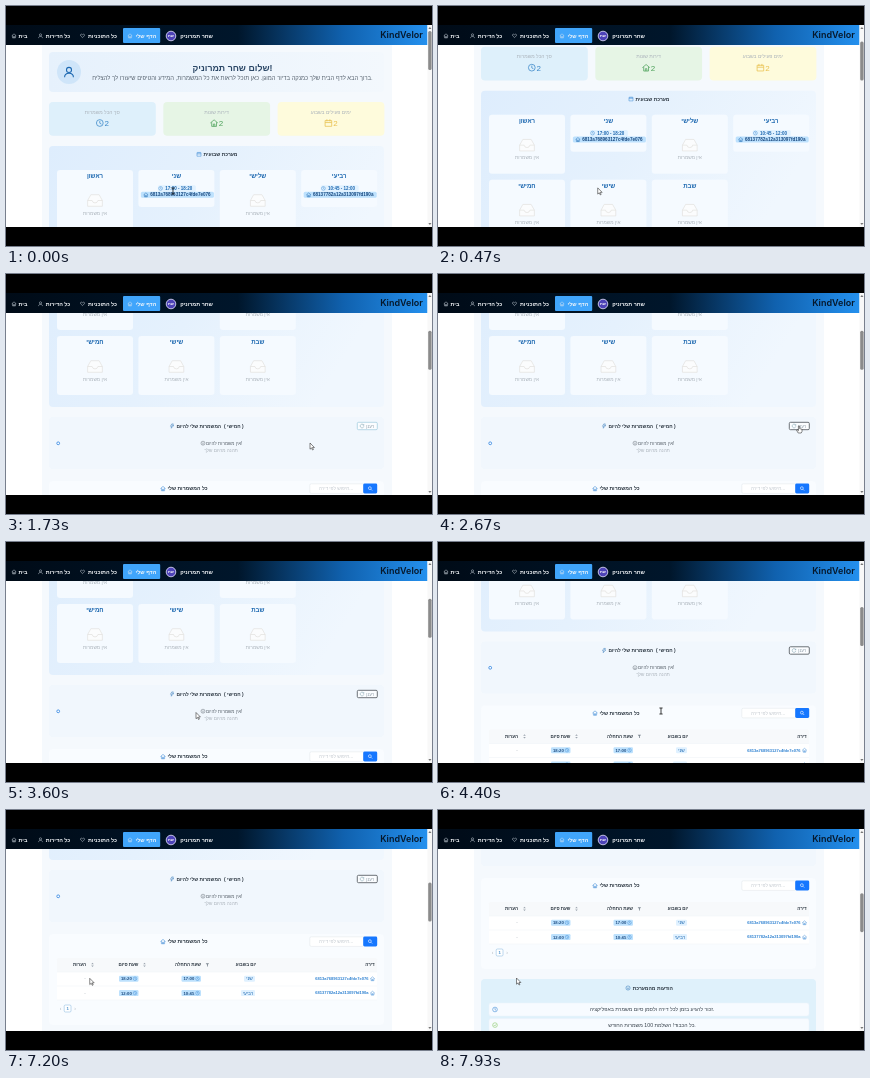
Write an HTML page that moves like this. It is 426 by 240 pixels and loops after 8 s.

```html
<!DOCTYPE html>
<html lang="he">
<head>
<meta charset="utf-8">
<title>Dashboard</title>
<style>
html, body { margin: 0; width: 100%; height: 100%; overflow: hidden; background: #000; }
svg { display: block; width: 100vw; height: 100vh; }
text { font-family: "Liberation Sans", Arial, sans-serif; }
.brand { font-family: Inter, sans-serif; }
</style>
</head>
<body>
<svg id="stage" viewBox="0 0 426 240" direction="ltr">
  <defs>
    <clipPath id="view"><rect y="19" width="426" height="202"/></clipPath>
    <linearGradient id="bar">
      <stop stop-color="#000b17"/><stop offset=".55" stop-color="#00162b"/>
      <stop offset=".8" stop-color="#1061ae"/><stop offset="1" stop-color="#2490ee"/>
    </linearGradient>
    <linearGradient id="hello"><stop stop-color="#e6f1fc"/><stop offset="1" stop-color="#f3f8fd"/></linearGradient>
    <linearGradient id="week" x2="1" y2=".3"><stop stop-color="#deedfd"/><stop offset=".5" stop-color="#e5f1fd"/><stop offset="1" stop-color="#f0f7fe"/></linearGradient>
    <g id="home" fill="none" stroke="currentColor" stroke-linejoin="round"><path d="M0 5 5 .8 10 5M1.8 4V9.5H8.2V4M4 9.5V6.4H6V9.5"/></g>
    <g id="clock" fill="none" stroke="currentColor"><circle cx="5" cy="5" r="4.5"/><path d="M5 2.2V5.3L7.2 6.5"/></g>
    <g id="user" fill="none" stroke="currentColor"><circle cx="5" cy="3" r="2.4"/><path d="M.8 10C.8 4.8 9.2 4.8 9.2 10"/></g>
    <g id="heart" fill="none" stroke="currentColor"><path d="M5 9 1 5C-.8 2 3 0 5 2.7 7 0 10.8 2 9 5Z"/></g>
    <g id="calendar" fill="none" stroke="currentColor"><path d="M.6 1.8H9.4V9.4H.6ZM.6 4.4H9.4M3 0V2.8M7 0V2.8"/></g>
    <g id="smile" fill="none" stroke="currentColor"><circle cx="5" cy="5" r="4.5"/><path d="M2.8 5.8Q5 8.6 7.2 5.8M3.3 3.2V4.2M6.7 3.2V4.2"/></g>
    <g id="bolt" fill="none" stroke="currentColor"><path d="M4.5.5H8L6 4H9L3 9.8 4.3 5.6H1.8Z"/></g>
    <g id="reload" fill="none" stroke="currentColor"><path d="M9 3A4.4 4.4 0 1 0 9.4 6M9.3.8V3.3H6.8"/></g>
    <g id="search" fill="none" stroke="currentColor" stroke-width="1.4"><circle cx="4.2" cy="4.2" r="3.4"/><path d="M6.8 6.8 9.8 9.8"/></g>
    <g id="check" fill="none" stroke="currentColor"><circle cx="5" cy="5" r="4.5"/><path d="M2.8 5 4.5 6.8 7.4 3.4"/></g>
    <g id="tray" fill="#fbfcfd" stroke="currentColor" stroke-width=".4" stroke-linejoin="round"><path d="M.4 5 2.4 1.4H7.6L9.6 5V8.6H.4Z"/><path d="M.4 5H3.2Q3.4 6.5 5 6.5T6.8 5H9.6"/></g>
  </defs>
  <g clip-path="url(#view)">
    <rect y="19" width="426" height="202" fill="#fff"/>
    <rect x="36" y="19" width="350" height="202" fill="#f5f9fd"/>
    <g id="page"></g>
    <g id="header"></g>
    <g id="cursor">
      <path id="arrow" d="M0 0V6.2L1.5 4.9 2.5 7 3.4 6.6 2.5 4.5H4.4Z" fill="#fff" stroke="#222" stroke-width=".55"/>
      <path id="beam" d="M-1.6-3H1.6M0-3V3M-1.6 3H1.6" fill="none" stroke="#111" stroke-width=".8"/>
      <path id="hand" d="M-.6 0Q0-.8.6 0V2.6L3 3.3V5.5L2.2 7H-.8L-2.4 4.3-1.8 3.8-.6 4.8Z" fill="#fff" stroke="#111" stroke-width=".5"/>
    </g>
  </g>
</svg>
<script>
const $ = id => document.getElementById(id);
const BLUE = '#2a7fd0', DEEP = '#1b67b0', INK = '#27323d', GREY = '#a9b1b9', PALE = '#bde1fd';

const rect = (x, y, w, h, fill, r = 0, stroke = 'none', sw = .5) =>
  `<rect x="${x}" y="${y}" width="${w}" height="${h}" rx="${r}" fill="${fill}" stroke="${stroke}" stroke-width="${sw}"/>`;
// x, y is the centre of the line unless an anchor is given
const text = (x, y, s, size, fill = INK, weight = 400, anchor = 'middle', extra = '') =>
  `<text x="${x}" y="${y + size * .34}" font-size="${size}" fill="${fill}" font-weight="${weight}" text-anchor="${anchor}" ${extra}>${s}</text>`;
const icon = (name, x, y, size, color) =>
  `<use href="#${name}" color="${color}" transform="translate(${x - size / 2} ${y - size / 2}) scale(${size / 10})"/>`;
const line = (x1, y1, x2, y2, color) => `<path d="M${x1} ${y1}L${x2} ${y2}" stroke="${color}" stroke-width=".5" fill="none"/>`;

const NAME = 'שחר תמרוניק';
const SHIFTS = [
  { day: 'שני', from: '17:00', to: '18:20', flat: '6813a768963127c4fde7e076' },
  { day: 'רביעי', from: '10:45', to: '12:00', flat: '68137782a12a313097fd190a' }
];

function welcome() {
  return rect(43, 46, 335, 40, 'url(#hello)', 4) +
    '<circle cx="63" cy="66" r="12" fill="#cfe5f9"/>' + icon('user', 63, 66, 10.5, DEEP) +
    text(226.5, 62, `שלום ${NAME}!`, 8.8, '#2b4766', 700) +
    text(226.5, 72, 'ברוך הבא לדף הבית שלך כמנקה בדיור המוגן. כאן תוכל לראות את כל המשמרות, המידע והטיפים שיעזרו לך להצליח.', 5.85, '#56626e');
}

function stats() {
  return [
    [43, '#def0fb', '#3a87c8', 'clock', 'סך הכל משמרות'],
    [157.3, '#e6f5e5', '#4fa35c', 'home', 'דירות שונות'],
    [271.6, '#fefbdc', '#e9c04e', 'calendar', 'ימים פעילים בשבוע']
  ].map(([x, fill, color, glyph, label]) =>
    rect(x, 96, 106.8, 33.8, fill, 4) + text(x + 53.3, 106, label, 5, GREY) +
    icon(glyph, x + 50.8, 117, 7.5, color) + text(x + 57.8, 117.2, '2', 8, color)).join('');
}

function dayCard(x, y, day) {
  const shift = SHIFTS.find(s => s.day === day), mid = x + 38;
  let out = rect(x, y, 76, shift ? 37 : 59, '#f5faff', 3) + text(mid, y + 6, day, 6.1, DEEP, 700);
  if (!shift) return out + icon('tray', mid, y + 30.5, 16, '#e0dedb') + text(mid, y + 43.2, 'אין משמרות', 4.8, GREY);
  return out + rect(mid - 18.5, y + 15.3, 38, 6.2, '#e2f2ff', 1.5) + icon('clock', mid - 15.8, y + 18.4, 4.2, BLUE) +
    text(mid + 2.3, y + 18.4, `${shift.from} - ${shift.to}`, 4.5, DEEP, 700) +
    rect(mid - 35.5, y + 21.8, 73, 6, PALE, 1.5) + icon('home', mid - 30.5, y + 24.8, 4.6, DEEP) +
    text(mid + 4, y + 24.8, shift.flat, 4.6, '#1a4a80', 700);
}

function week() {
  const days = ['ראשון', 'שני', 'שלישי', 'רביעי', 'חמישי', 'שישי', 'שבת'];
  return rect(43, 140, 335, 160, 'url(#week)', 4) + icon('calendar', 193, 148.2, 4.6, BLUE) +
    text(214.5, 148.2, 'מערכת שבועית', 5, INK, 700) +
    days.map((d, i) => dayCard(51 + 81.4 * (i % 4), i < 4 ? 164 : 229, d)).join('');
}

function today() {
  return rect(43, 310, 335, 52, '#f1f7fd', 4) + icon('bolt', 166, 319, 4.6, DEEP) +
    text(192.8, 319, 'המשמרות שלי להיום', 4.8, INK, 700) + text(227.8, 319, '( חמישי )', 4.8, INK, 700) +
    '<rect id="refresh" x="351.3" y="315.3" width="20" height="7.4" rx="1.2" fill="#fbfdff"/>' +
    icon('reload', 356, 319, 4.2, '#5d8699') + text(364.3, 319, 'רענן', 4.5, '#8d9ba6') +
    '<circle cx="52.2" cy="336.3" r="1.4" fill="#fff" stroke="#2a80e0" stroke-width=".8"/>' +
    icon('smile', 197, 336.2, 4.4, '#555e67') + text(218.2, 336.2, 'אין משמרות להיום!', 4.6, '#555e67') +
    text(215, 343, 'תהנה מהיום שלך', 4.7, GREY);
}

const timeTag = (x, y, time) => rect(x, y - 3, 19.5, 6, PALE, 1.2) +
  text(x + 7.4, y, time, 4.2, '#1a4a80', 700) + icon('clock', x + 16, y, 4, BLUE);
const sorter = (x, y) => `<path d="M${x - 1.3} ${y - .5}l1.3-1.5 1.3 1.5zM${x - 1.3} ${y + .6}l1.3 1.5 1.3-1.5z" fill="#9aa3ad"/>`;

function table() {
  const heads = [[364, 'דירה'], [240, 'יום בשבוע'], [182, 'שעת התחלה'], [122.5, 'שעת סיום'], [73.5, 'הערות']];
  return rect(43, 374, 335, 91, '#f9fcff', 4) + icon('home', 157, 381.5, 5, BLUE) +
    text(181.5, 381.5, 'כל המשמרות שלי', 5.1, INK, 700) +
    rect(303.8, 376.8, 54, 9.6, '#fff', 1.4, '#dfe4e9') + text(330, 381.5, 'חיפוש לפי דירה...', 4.8, '#c3c9cf') +
    rect(357.2, 376.5, 14, 10, '#1677ff', 1.4) + icon('search', 364.2, 381.5, 4.2, '#fff') +
    rect(51, 398, 320, 14, '#f7f9fb', 1.5) + rect(51, 412, 320, 28, '#fff') +
    heads.map(([x, s]) => text(x, 404.8, s, 4.5, INK, 700)).join('') +
    '<path d="M199.7 403.2h3.4l-1.3 1.6v1.6h-.8v-1.6z" fill="#7d8791"/>' + sorter(138.5, 404.8) + sorter(86.5, 404.8) +
    [412, 426, 440].map(y => line(51, y, 371, y, '#edf1f5')).join('') +
    SHIFTS.map((s, i) => {
      const y = 418.7 + i * 14.4;
      return text(362.5, y, s.flat, 4.05, BLUE, 700, 'end') + icon('home', 366.5, y, 4.4, BLUE) +
        rect(i ? 235 : 238, y - 3, i ? 14 : 11, 6, '#e0f1ff', 1.2) + text(i ? 242 : 243.5, y, s.day, 4.7, DEEP) +
        timeTag(175.5, y, s.from) + timeTag(113, y, s.to) + text(79, y, '-', 4.5, GREY);
    }).join('') +
    text(54.5, 448.5, '‹', 5, GREY) + rect(58.2, 445, 6.8, 7, '#fff', 1.2, '#7fb3dc') +
    text(61.6, 448.6, '1', 4.3, '#4a90cc', 700) + text(69, 448.5, '›', 5, GREY);
}

function messages() {
  return rect(43, 475, 335, 80, '#dff1fb', 4) + icon('smile', 190, 484, 4.6, DEEP) +
    text(214.8, 484, 'הודעות מהמערכת', 5, INK, 700) +
    [['clock', BLUE, 'זכור להגיע בזמן לכל דירה ולסמן סיום משמרת באפליקציה.'],
     ['check', '#7cc455', 'כל הכבוד! השלמת 100 משמרות החודש.']].map(([glyph, color, s], i) => {
      const y = 499 + i * 15.6;
      return rect(51, y, 320, 13, '#f7fbff', 2, '#e8f1f8') + icon(glyph, 57, y + 6.5, 5.2, color) +
        text(214, y + 6.6, s, 5.2, '#36404a');
    }).join('');
}

function header() {
  const items = [[17, 8, 'home', 'בית'], [52, 34.5, 'user', 'כל הדירות'], [96.5, 76.5, 'heart', 'כל התוכניות'], [140, 124, 'home', 'הדף שלי']];
  return rect(0, 19, 421.5, 20, 'url(#bar)') + rect(117, 22, 37.2, 15, '#40a5fb', 1) +
    items.map(([x, ix, glyph, s]) => icon(glyph, ix, 29.8, 4.6, '#dfe7f0') + text(x, 29.7, s, 5.4, '#f4f7fa', 700)).join('') +
    '<circle cx="165" cy="30" r="4.8" fill="#4d43b8" stroke="#e8e6ff" stroke-width=".8"/>' + text(165, 30, 'שת', 3.8, '#fff', 700) +
    text(190.5, 29.7, NAME, 5.4, '#f4f7fa', 700) +
    text(395.5, 29.3, 'KindVelor', 9, '#06182b', 600, 'middle', 'class="brand"') +
    rect(421.5, 19, 4.5, 202, '#f8f8f8') +
    '<path d="M422.3 23l1.6-2 1.6 2zM422.3 217l1.6 2 1.6-2z" fill="#777"/>' +
    '<rect id="thumb" x="422.2" y="25" width="3.4" height="39" rx="1.6" fill="#8b8b8b"/>';
}

$('page').innerHTML = welcome() + stats() + week() + today() + table() + messages();
$('header').innerHTML = header();

const LOOP = 8000;
// [start, end, distance] of each wheel turn
const WHEEL = [[200, 480, 55.5], [520, 800, 55.5], [1150, 1450, 56], [4210, 4580, 83], [7600, 7920, 56]];
// [time, x, y, shape taken from here on]
const MOVES = [
  [0, 167, 185, 'beam'], [350, 160, 182, 'arrow'], [1000, 157, 180.5, 'arrow'], [1250, 157, 180.5, 'arrow'],
  [1730, 304, 169, 'arrow'], [2300, 361, 152, 'hand'], [2900, 361, 152, 'hand'], [2960, 355, 154, 'arrow'],
  [3600, 190, 170.5, 'arrow'], [4100, 223, 169, 'beam'], [4600, 223, 169, 'arrow'], [5200, 240, 172, 'arrow'],
  [5730, 256, 169, 'arrow'], [6400, 235, 178, 'arrow'], [7300, 78.5, 168, 'arrow'], [LOOP, 78.5, 168, 'arrow']
];
const CLICK = 2500;
const smooth = p => { p = Math.min(1, Math.max(0, p)); return p * p * (3 - 2 * p); };

function draw() {
  const t = performance.now() % LOOP;
  const scroll = WHEEL.reduce((sum, [a, b, d]) => sum + d * smooth((t - a) / (b - a)), 0);
  $('page').setAttribute('transform', `translate(0 ${-scroll})`);
  $('thumb').setAttribute('y', 25 + scroll * .19);

  const i = MOVES.findLastIndex(m => m[0] <= t);
  const [t0, x0, y0, shape] = MOVES[i], [t1, x1, y1] = MOVES[i + 1];
  const p = smooth((t - t0) / (t1 - t0));
  $('cursor').setAttribute('transform', `translate(${x0 + (x1 - x0) * p} ${y0 + (y1 - y0) * p})`);
  for (const id of ['arrow', 'beam', 'hand']) $(id).setAttribute('visibility', id === shape ? 'visible' : 'hidden');

  const focused = t >= CLICK;
  $('refresh').setAttribute('stroke', focused ? '#4a5056' : '#8cc0d6');
  $('refresh').setAttribute('stroke-width', focused ? .8 : .6);
  requestAnimationFrame(draw);
}
draw();
</script>
</body>
</html>
```
